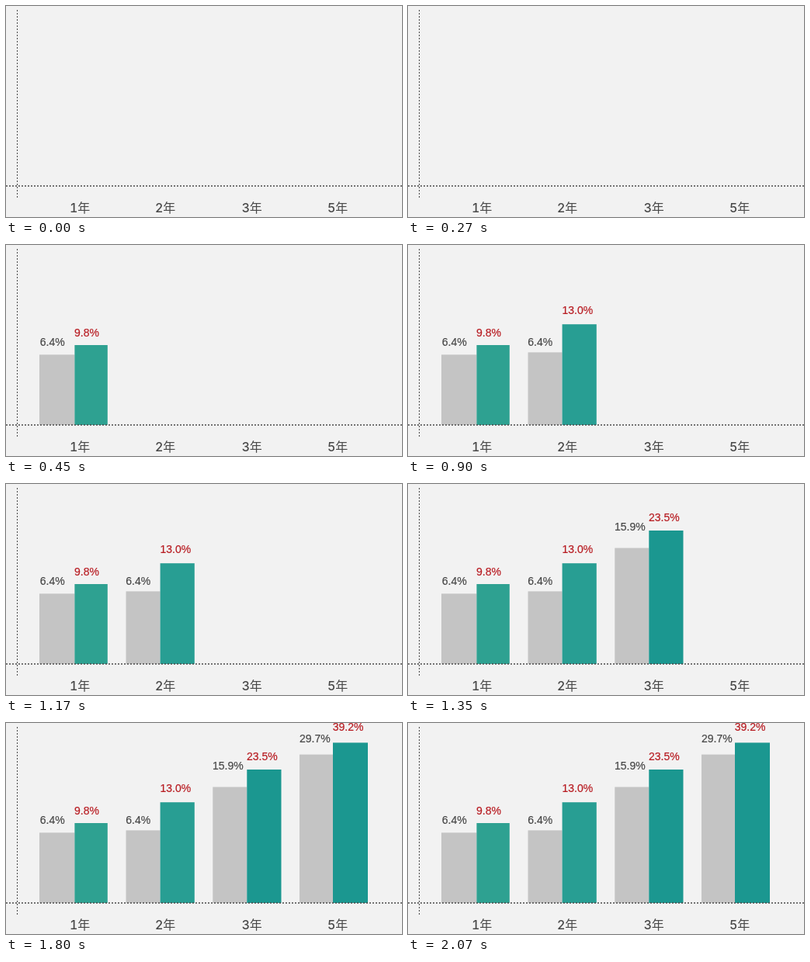
Animation of 510 by 272 pixels, one loop 2.25 s. Source, as an HTML page:

```html
<!DOCTYPE html>
<html lang="ja">
<head>
<meta charset="utf-8">
<title>Bar chart</title>
<style>
  html, body { margin: 0; width: 100%; height: 100%; overflow: hidden; background: #f2f2f2; }
  svg { display: block; width: 510px; height: 272px; }
  text { font: 14px "Liberation Sans", Arial, sans-serif; fill: #484848; stroke: #484848; stroke-width: .2; }
  .gain { fill: #b81c22; stroke: #b81c22; }
  .year { font: 500 16px Inter, "Noto Sans CJK JP", "Noto Sans CJK", sans-serif; font-variant-numeric: tabular-nums; stroke: none; }
  .axis { stroke: #484848; stroke-dasharray: 2 2; fill: none; }
</style>
</head>
<body>
<svg id="chart" viewBox="0 0 510 272"></svg>
<script>
const NS = "http://www.w3.org/2000/svg";
const chart = document.getElementById("chart");
const STEP = 450, LOOP = 2250, BASE = 232;

// Bars: [left, right, top, value, label x, label baseline]
const groups = [
  { year: "1年", x: 82, color: "#2ea191", base: [43, 88.4, 141.4, "6.4%", 43.8, 130], gain: [88.4, 130.8, 129, "9.8%", 88, 118] },
  { year: "2年", x: 192, color: "#289e93", base: [154.5, 198.6, 138.4, "6.4%", 154.3, 130], gain: [198.6, 242.8, 102.2, "13.0%", 198.5, 89] },
  { year: "3年", x: 303.5, color: "#1b9790", base: [266.3, 310.3, 82.5, "15.9%", 266, 60], gain: [310.3, 354.5, 60, "23.5%", 310, 48] },
  { year: "5年", x: 414, color: "#1b9790", base: [378, 421, 40.6, "29.7%", 378, 25], gain: [421, 466, 25.4, "39.2%", 420.7, 10] }
];

function add(parent, tag, attrs = {}, text = "") {
  const node = document.createElementNS(NS, tag);
  for (const key in attrs) node.setAttribute(key, attrs[key]);
  node.textContent = text;
  return parent.appendChild(node);
}

function addBar(parent, [left, right, top, value, x, y], fill, cls) {
  add(parent, "rect", { x: left, y: top, width: right - left, height: BASE - top, fill });
  add(parent, "text", { x, y, class: cls }, value);
}

groups.forEach((group, i) => {
  const bars = add(chart, "g");
  addBar(bars, group.base, "#c4c4c4", "base");
  addBar(bars, group.gain, group.color, "gain");
  add(chart, "text", { x: group.x, y: 266, class: "year" }, group.year);

  const start = (i + 1) * STEP / LOOP;
  bars.animate([
    { visibility: "hidden", offset: 0, easing: "step-end" },
    { visibility: "visible", offset: start, easing: "step-end" },
    { visibility: "visible", offset: 1 }
  ], { duration: LOOP, iterations: Infinity });
});

add(chart, "path", { class: "axis", d: "M14.5 5V247" });
add(chart, "path", { class: "axis", d: "M0 232H510", "stroke-width": 1.4 });
</script>
</body>
</html>
```
